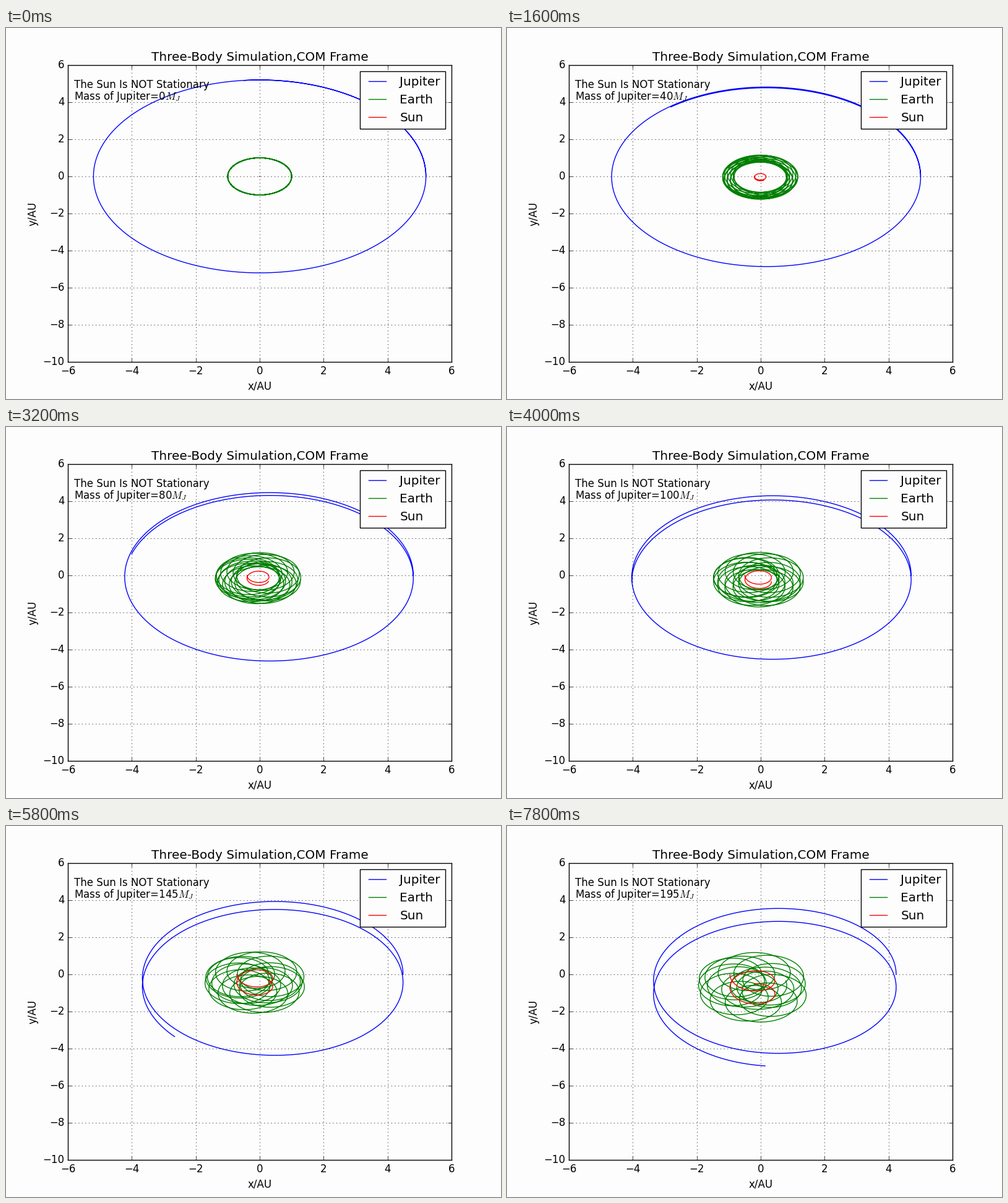
Animation of 800 by 600 pixels, one loop 8 s. Source, as a matplotlib script:

```python
import numpy as np
import matplotlib.pyplot as plt
from matplotlib.animation import FuncAnimation

PAPER = "#fdfdfd"
plt.style.use("classic")
plt.rcParams.update({"savefig.facecolor": PAPER, "savefig.dpi": 100})

FRAMES, INTERVAL = 40, 200
MASS_STEP = 5                     # Jupiter masses added per frame
GM = 4 * np.pi ** 2               # AU^3 / yr^2 for one solar mass
M_JUP, M_EARTH = 0.00095, 3e-6    # solar masses
R_JUP = 5.2
YEARS, STEPS = 15, 3000


def accel(pos, mass):
    """Pull of every body on every other; pos is (run, body, xy)."""
    gap = pos[:, None, :, :] - pos[:, :, None, :]
    d2 = (gap ** 2).sum(-1)
    d2[:, range(3), range(3)] = 1
    weight = GM * mass[:, None, :] / d2 ** 1.5
    return (weight[..., None] * gap).sum(2)


def simulate():
    """Integrate all mass settings at once with RK4."""
    mass = np.ones((FRAMES, 3))
    mass[:, 0] = M_JUP * MASS_STEP * np.arange(FRAMES)
    mass[:, 1] = M_EARTH

    pos = np.zeros((FRAMES, 3, 2))
    vel = np.zeros((FRAMES, 3, 2))
    pos[:, :, 0] = R_JUP, 1, 0
    vel[:, :, 1] = np.sqrt(GM / R_JUP), np.sqrt(GM), 0
    # Sums are per solar mass, so heavy planets leave a slow drift.
    for state in (pos, vel):
        state -= (mass[..., None] * state).sum(1, keepdims=True)

    dt = YEARS / STEPS
    track = [pos]
    for _ in range(STEPS):
        a1 = accel(pos, mass)
        v2 = vel + a1 * dt / 2
        a2 = accel(pos + vel * dt / 2, mass)
        v3 = vel + a2 * dt / 2
        a3 = accel(pos + v2 * dt / 2, mass)
        v4 = vel + a3 * dt
        a4 = accel(pos + v3 * dt, mass)
        pos = pos + dt / 6 * (vel + 2 * v2 + 2 * v3 + v4)
        vel = vel + dt / 6 * (a1 + 2 * a2 + 2 * a3 + a4)
        track.append(pos)
    return np.array(track)


track = simulate()

fig = plt.figure(figsize=(8, 6), dpi=100, facecolor=PAPER)
ax = fig.add_axes([0.125, 0.1, 0.775, 0.8], facecolor=PAPER)
ax.set_xlim(-6, 6)
ax.set_ylim(-10, 6)
ax.set_xticks(range(-6, 7, 2))
ax.set_yticks(range(-10, 7, 2))
ax.grid(True)
ax.set_title("Three-Body Simulation,COM Frame")
ax.set_xlabel("x/AU")
ax.set_ylabel("y/AU")

lines = [ax.plot([], [], color, label=name)[0]
         for name, color in (("Jupiter", "b"), ("Earth", "g"), ("Sun", "r"))]
ax.legend(loc="upper right").get_frame().set_facecolor(PAPER)
ax.text(-5.8, 4.767, "The Sun Is NOT Stationary")
note = ax.text(-5.8, 4.133, "")


def draw(i):
    for body, line in enumerate(lines):
        line.set_data(track[:, i, body, 0], track[:, i, body, 1])
    note.set_text(f"Mass of Jupiter={MASS_STEP * i}$M_J$")
    return [*lines, note]


anim = FuncAnimation(fig, draw, frames=FRAMES, init_func=lambda: draw(0),
                     interval=INTERVAL, repeat=True, repeat_delay=0)
plt.show()
```
